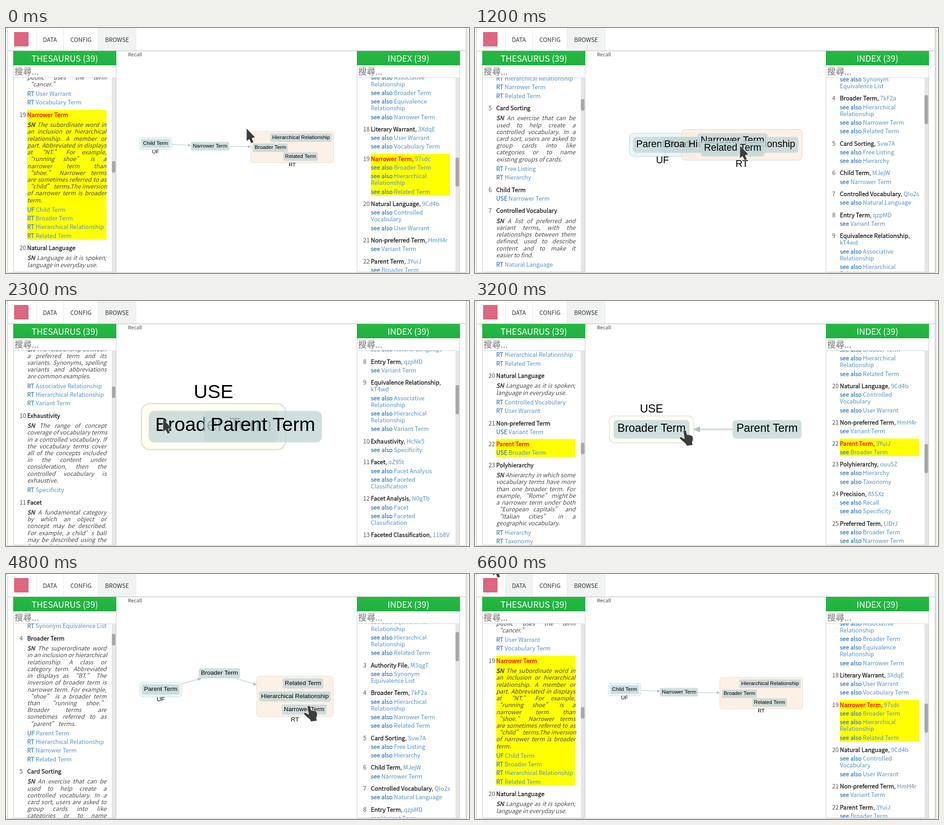
These frames come from a looping animation (1028 by 545 pixels, 6.7 s). An HTML page with a canvas:

```html
<!DOCTYPE html>
<html lang="zh-TW">
<head>
<meta charset="utf-8">
<title>Thesaurus browser</title>
<style>
html, body { margin: 0; width: 100%; height: 100%; overflow: hidden; background: #fff; }
body { position: relative; font: 300 13px/15.2px "Noto Sans CJK TC Light", "Noto Sans CJK TC", "Noto Sans CJK SC", "Noto Sans CJK JP", "Noto Sans CJK", "Noto Sans", sans-serif; color: #222; white-space: nowrap; }
div, canvas, svg { box-sizing: border-box; }
b { font-weight: inherit; -webkit-text-stroke: .35px currentColor; }
.abs, .nav div, .panel, .panel > div, .bar, .list { position: absolute; }
.frame { left: 3px; top: 0; width: 1019px; height: 545px; border: 1px solid #bbb; border-top: 0; box-shadow: 3px 0 4px #ddd; }
.nav { left: 4px; top: 0; width: 1017px; height: 51px; border-bottom: 1px solid #c8c8c8; box-shadow: 0 1px 2px #e4e4e4; }
.nav div { top: 0; height: 50px; line-height: 51px; text-align: center; border-right: 1px solid #e6e7e7; font-weight: 400; color: #333; }
.nav .on { background: #f1f2f2; }
.logo { left: 18px; top: 9px; width: 32px; height: 32px; background: #dd6680; }
.panel { top: 51px; width: 229px; height: 492px; border: 1px solid #ccc; }
.panel .head { left: -1px; top: -1px; width: 229px; height: 32px; background: linear-gradient(#25b942, #1fb141); color: #fff; font-weight: 400; font-size: 19px; line-height: 31px; text-align: center; }
.panel .find { left: 0; top: 31px; width: 227px; height: 28px; padding-left: 2px; border-bottom: 1px solid #d4d4d4; font-size: 19px; line-height: 25px; color: #757575; }
.panel .view { left: 0; top: 58px; width: 227px; height: 432px; overflow: hidden; }
.track { position: absolute; right: 0; top: 0; width: 9px; height: 432px; background: #e5e5e5; }
.bar { left: 0; width: 8px; border-radius: 4px; background: #a8a8a8; }
.list { left: 30px; top: 0; width: 176px; }
.entry { position: relative; padding: 3px 0 2.2px; margin-bottom: 7px; }
.entry i { position: absolute; left: -17px; font-style: normal; color: #555; }
.entry.hit { background: #ff0; }
.hit .name { color: #f00; }
.link { padding-top: 4px; }
.link, .code { color: #5591cd; }
.link b { color: #4183c4; }
.note { padding: 7.3px 0 2.2px; font-style: italic; color: #4c4c4c; }
.note b { color: #222; }
.note div { text-align: justify; text-align-last: justify; }
.note div:last-child { text-align-last: left; }
</style>
</head>
<body>
<div class="abs frame"></div>
<div class="abs nav">
  <div style="left:0;width:64px"></div>
  <div id="data" style="left:64px;width:60px">DATA</div>
  <div style="left:125px;width:76px">CONFIG</div>
  <div class="on" style="left:201px;width:84px">BROWSE</div>
</div>
<div class="abs logo"></div>
<div class="abs" style="left:271px;top:51px;font-size:11px;font-weight:400;color:#444">Recall</div>
<canvas class="abs" width="1028" height="545" style="left:0;top:0"></canvas>
<svg class="abs" width="1028" height="545" style="left:0;top:0;z-index:2">
  <g id="cursor" fill="#3c3c3c" stroke="#fff" stroke-width=".8">
    <path d="M0 0V29L6 24.500L10.500 33.500L16 31L12 22.500L19 20Z"/>
    <path transform="scale(.93)" d="M9 3Q9 0 12 0Q15 0 16 3L18 11Q25 11 30 14Q33 16 32 24L30 30L32 36L17 38L15 33L2 22Q-1 18 3 16L12 21Z"/>
  </g>
</svg>
<script>
// name; code; scope note lines; relations
const entries = `Associative Relationship;sd3JB;A relationship between|terms that are related.;RT Equivalence Relationship,RT Hierarchical Relationship,RT Related Term
Authority File;M3qgT;A list of terms includ-|ring with the preferred term|identified for each concept.;BT Controlled Vocabulary,RT Synonym Equivalence List
Broader Term;7kF2a;The superordinate word|in an inclusion or hierarchical|relationship. A class or|category term. Abbreviated|in displays as “BT.” The|inversion of broader term is|narrower term. For example,|“shoe” is a broader term|than “running shoe.”|Broader terms are|sometimes referred to as|“parent” terms.;UF Parent Term,RT Hierarchical Relationship,RT Narrower Term,RT Related Term
Card Sorting;Svw7A;An exercise that can be|used to help create a|controlled vocabulary. In a|card sort, users are asked to|group cards into like|categories or to name|existing groups of cards.;RT Free Listing,RT Hierarchy
Child Term;MJejW;;USE Narrower Term
Controlled Vocabulary;QIo2s;A list of preferred and|variant terms, with the|relationships between them|defined, used to describe|content and to make it|easier to find.;RT Natural Language
Entry Term;qzpMD;;USE Variant Term
Equivalence Relationship;kT4wd;The relationship between|a preferred term and its|variants. Synonyms, spelling|variants and abbreviations|are common examples.;RT Associative Relationship,RT Hierarchical Relationship,RT Variant Term
Exhaustivity;HcNe5;The range of concept|coverage of vocabulary terms|in a controlled vocabulary. If|the vocabulary terms cover|all of the concepts included|in the content under|consideration, then the|controlled vocabulary is|exhaustive.;RT Specificity
Facet;oZ95t;A fundamental category|by which an object or|concept may be described.|For example, a child’s ball|may be described using the|facets of size, weight, shape,|color, texture, material and|price.;RT Facet Analysis,RT Faceted Classification
Facet Analysis;N0gTb;The process of analyzing|content to determine|appropriate facets and;RT Facet,RT Faceted Classification
Faceted Classification;11b8V;A controlled vocabulary|that divides vocabulary|terms into facets.;BT Controlled Vocabulary
Free Listing;DfnKV;;RT Card Sorting,RT User Warrant
Granularity;Prll0;The level of specificity|with which content is|described. The more|granular, the more specific.;RT Specificity
Hierarchy;WOdFC;A collection of vocabulary|terms that show levels of|superordination and|subordination. Hierarchies|comprise broader terms and|narrower terms. Hierarchies|may be testing using card|sorting.;RT Card Sorting,RT Polyhierarchy,RT Taxonomy
Hierarchical Relationship;mVGXD;The relationship between|a broader term and its|narrower terms, as between|a class and its members or|a whole and its parts.;RT Associative Relationship,RT Broader Term,RT Equivalence Relationship,RT Narrower Term
Literary Warrant;3XdqE;Choosing a term because|it is found in the content|being described, even if the|public uses the term|“cancer.”;RT User Warrant,RT Vocabulary Term
Narrower Term;97sdc;The subordinate word in|an inclusion or hierarchical|relationship. A member or|part. Abbreviated in displays|at “NT.” For example,|“running shoe” is a|narrower term than|“shoe.” Narrower terms|are sometimes referred to as|“child” terms.The inversion|of narrower term is broader|term.;UF Child Term,RT Broader Term,RT Hierarchical Relationship,RT Related Term
Natural Language;9Cd4b;Language as it is spoken;|language in everyday use.;RT Controlled Vocabulary,RT User Warrant
Non-preferred Term;HmH4r;;USE Variant Term
Parent Term;3YuiJ;;USE Broader Term
Polyhierarchy;ouu5Z;Ahierarchy in which some|vocabulary terms have more|than one broader term. For|example, “Rome” might be|a narrower term under both|“European capitals” and|“Italian cities” in a|geographic vocabulary.;RT Hierarchy,RT Taxonomy
Precision;85SXz;The share of results that|are relevant to a search.;RT Recall,RT Specificity
Preferred Term;LIDrJ;The term chosen to stand|for a concept.;RT Broader Term,RT Narrower Term,RT Variant Term`
  .split('\n').map((line, i) => {
    const parts = line.split(';'), links = parts.pop();
    return { id: i + 2, name: parts[0], code: parts[1], note: parts.slice(2).join(';'),
      links: links.split(',').map(s => [s.slice(0, s.indexOf(' ')), s.slice(s.indexOf(' ') + 1)]) };
  });

const link = (kind, name) => `<div class="link"><b>${kind}</b> ${name}</div>`;
const noteHtml = note => note &&
  `<div class="note">${note.split('|').map((s, i) => `<div>${i ? '' : '<b>SN</b> '}${s}</div>`).join('')}</div>`;
const fold = name => name.length > 20 ? name.replace(' ', '<br>') : name;

const thesaurusBody = e => noteHtml(e.note) + e.links.map(l => link(...l)).join('');
const indexBody = e => e.links.filter(l => /RT|USE/.test(l[0]))
  .map(([kind, name]) => link(kind === 'RT' ? 'see also' : 'see', fold(name))).join('');
const codeHtml = e => `,${e.name.length > 22 ? '<br>' : ' '}<span class="code">${e.code}</span>`;

function makePanel(left, title, barHeight, head, body) {
  const el = document.createElement('div');
  el.className = 'panel';
  el.style.left = left + 'px';
  el.innerHTML = `<div class="head">${title} (39)</div><div class="find">搜尋...</div>
    <div class="view"><div class="list">${entries.map(e =>
      `<div class="entry"><i>${e.id}</i><b class="name">${e.name}</b>${head(e)}${body(e)}</div>`).join('')}</div>
    <div class="track"><div class="bar" style="height:${barHeight}px"></div></div></div>`;
  document.body.append(el);
  return { list: el.querySelector('.list'), bar: el.querySelector('.bar'), rows: [...el.querySelectorAll('.entry')] };
}
const panels = [
  makePanel(16, 'THESAURUS', 26, () => '', thesaurusBody),
  makePanel(779, 'INDEX', 65, codeHtml, indexBody)
];

const lerp = (a, b, p) => a + (b - a) * p;
const easeIn = p => p * p, easeOut = p => p * (2 - p), easeBoth = p => (1 - Math.cos(Math.PI * p)) / 2;

// Returns the keys around t and the progress between them.
function span(keys, t) {
  let i = keys.length - 1;
  while (keys[i][0] > t) i--;
  const a = keys[i], b = keys[i + 1] || a;
  return [a, b, a === b ? 0 : (t - a[0]) / (b[0] - a[0])];
}

// Scroll stops: entry, its y in both panels, both scrollbar positions
const atNarrower = [19, 193, 291, 296, 288], atBroader = [4, 193, 290, 131, 124], atParent = [22, 318, 317, 315, 318];
const scrolls = [
  [0, atNarrower], [550, atNarrower],
  [900, [16, 368, 426, 263, 243], easeIn], [1450, atBroader, easeOut], [2050, atBroader],
  [2700, atParent, easeBoth], [3560, atParent],
  [3900, [11, 285, 260, 223, 210], easeIn], [4160, atBroader, easeOut], [4730, atBroader],
  [4800, [4, 143, 264, 133, 129], easeIn], [5430, atNarrower, easeBoth]
];

function drawPanels(t) {
  const [a, b, raw] = span(scrolls, t), p = (b[2] || easeBoth)(raw);
  const still = a[1] === b[1];
  panels.forEach(({ list, bar, rows }, side) => {
    const offset = ([id, ...v]) => v[side] - 120.6 - rows[id - 2].offsetTop;
    list.style.transform = `translateY(${Math.round(lerp(offset(a[1]), offset(b[1]), p))}px)`;
    bar.style.top = lerp(a[1][3 + side], b[1][3 + side], p) - 110 + 'px';
    rows.forEach((row, i) => row.classList.toggle('hit', still && i + 2 === a[1][0]));
  });
}

// Graphs: groups hold a label, first and last node; edges join boxes by key
const around = (side, main, ...rest) => ({
  names: [side, main, ...rest],
  groups: [['UF', 0, 1], ['RT', 2, 5]],
  edges: [['UF', 1], [1, 'RT']]
});
const narrower = around('Child Term', 'Narrower Term', 'Hierarchical Relationship', 'Broader Term', 'Related Term');
const broader = around('Parent Term', 'Broader Term', 'Hierarchical Relationship', 'Narrower Term', 'Related Term');
const parent = { names: ['Broader Term', 'Parent Term'], groups: [['USE', 0, 1]], edges: [[1, 'USE']] };

// Layouts: font size, then node centres
const pile = [34.2, ...Array(5).fill([512, 253]).flat()];
const narrowerLayout = [11.6, 332, 257, 453, 263, 655, 244, 587, 266.5, 654, 286];
const views = [
  [0, narrower, narrowerLayout],
  [600, broader, pile], [900, broader, pile],
  [1800, broader, [10.1, 331.5, 266, 461, 266, 664, 266, 624.5, 250, 625.5, 282]],
  [2100, parent, [56, 512, 275, 512, 275]],
  [2700, parent, [25, 392, 285.5, 648.5, 285.5]],
  [3700, broader, pile],
  [3900, broader, [23.5, 368, 256, 482, 224.5, 627, 269.5, 646.5, 295, 644.5, 243.5]],
  [4300, broader, [13.6, 343.5, 257, 474, 221, 641.5, 272.5, 662, 301.5, 659.5, 243.5]],
  [5200, narrower, pile], [5500, narrower, narrowerLayout]
];
const tints = {
  UF: ['rgba(226,245,246,.75)', '#cfe0e2'],
  RT: ['rgba(253,236,222,.75)', '#e6dcd6'],
  USE: ['rgba(255,255,238,.75)', '#dfe4dd']
};
const ctx = document.querySelector('canvas').getContext('2d');

function roundBox([l, t, r, b], radius, pad = 0) {
  ctx.beginPath();
  ctx.roundRect(l - pad, t - pad, r - l + 2 * pad, b - t + 2 * pad, radius);
}

// Point where the line from the box centre towards (x, y) leaves the box
function exit([l, t, r, b], x, y) {
  const cx = (l + r) / 2, cy = (t + b) / 2, dx = x - cx, dy = y - cy;
  const k = Math.min(1, (r - l) / 2 / (Math.abs(dx) || 1e-6), (b - t) / 2 / (Math.abs(dy) || 1e-6));
  return [cx + dx * k, cy + dy * k];
}

function drawEdge(from, to, size) {
  const mid = ([l, t, r, b]) => [(l + r) / 2, (t + b) / 2];
  const [x1, y1] = exit(from, ...mid(to)), [x2, y2] = exit(to, ...mid(from));
  const overlap = from[0] < to[2] && to[0] < from[2] && from[1] < to[3] && to[1] < from[3];
  if (overlap) return;
  ctx.strokeStyle = '#cfdfde';
  ctx.lineWidth = Math.max(1, size * .16);
  ctx.beginPath();
  ctx.moveTo(x1, y1);
  ctx.lineTo(x2, y2);
  ctx.stroke();
  ctx.save();
  ctx.translate(x2, y2);
  ctx.rotate(Math.atan2(y2 - y1, x2 - x1));
  ctx.fillStyle = '#b5bcbb';
  ctx.beginPath();
  ctx.moveTo(0, 0);
  ctx.lineTo(-size * .55, -size * .27);
  ctx.lineTo(-size * .55, size * .27);
  ctx.fill();
  ctx.restore();
}

function drawGraph(t) {
  const [a, next, raw] = span(views, t), b = next[1] === a[1] ? next : a, p = easeBoth(raw);
  const { names, groups, edges } = a[1], A = a[2], B = b[2];
  const size = 1 / lerp(1 / A[0], 1 / B[0], p);
  const place = (i, origin) => origin + lerp((A[i] - origin) / A[0], (B[i] - origin) / B[0], p) * size;

  ctx.clearRect(0, 0, 1028, 545);
  ctx.save();
  ctx.beginPath();
  ctx.rect(271, 70, 482, 472);
  ctx.clip();
  ctx.font = `${size}px "Liberation Sans", Arial, sans-serif`;
  ctx.textAlign = 'center';
  ctx.textBaseline = 'middle';

  const boxes = {};
  names.forEach((name, i) => {
    const x = place(2 * i + 1, 512), y = place(2 * i + 2, 265);
    const w = ctx.measureText(name).width / 2 + size * .34, h = size * .82;
    boxes[i] = [x - w, y - h, x + w, y + h];
  });
  for (const [label, first, end] of groups) {
    const inner = names.map((_, i) => boxes[i]).slice(first, end), pad = size * .38;
    const edge = (k, pick, d) => pick(...inner.map(box => box[k])) + d;
    const box = boxes[label] = [edge(0, Math.min, -pad), edge(1, Math.min, -pad), edge(2, Math.max, pad), edge(3, Math.max, pad)];
    roundBox(box, size * .45);
    [ctx.fillStyle, ctx.strokeStyle] = tints[label];
    ctx.lineWidth = Math.max(1, size * .07);
    ctx.fill();
    ctx.stroke();
    ctx.fillStyle = '#000';
    ctx.fillText(label, (box[0] + box[2]) / 2, label === 'USE' ? box[1] - size * .56 : box[3] + size * .44);
  }
  edges.forEach(([from, to]) => drawEdge(boxes[from], boxes[to], size));
  names.forEach((name, i) => {
    const [l, top, r, bottom] = boxes[i];
    roundBox(boxes[i], size * .3);
    ctx.fillStyle = 'rgba(195,215,215,.8)';
    ctx.fill();
    ctx.fillStyle = '#000';
    ctx.fillText(name, (l + r) / 2, (top + bottom) / 2 - size * .05);
  });
  const pressed = t >= 1900 && t < 2100 ? 'UF' : t >= 3500 && t < 3700 ? 'USE' : '';
  if (pressed) {
    roundBox(boxes[pressed], size * .3, size * .25);
    ctx.fillStyle = 'rgba(0,0,0,.27)';
    ctx.fill();
  }
  ctx.restore();
}

// Pointer path: x, y, hand or arrow
const path = [
  [0, 534, 223, 0], [100, 565, 245, 0], [200, 588, 261, 1], [1200, 588, 261, 0], [1800, 322, 256, 1],
  [2200, 322, 256, 0], [2700, 454, 287, 1], [3700, 454, 287, 1], [3900, 441, 279, 1], [4300, 661, 338, 1],
  [4600, 661, 293, 1], [5500, 661, 293, 0], [6200, 100, -3, 0], [6400, 57, -14, 0], [6600, 40, -25, 0]
];
const cursor = document.getElementById('cursor');

function drawCursor(t) {
  const [a, b, p] = span(path, t);
  cursor.setAttribute('transform', `translate(${lerp(a[1], b[1], p)} ${lerp(a[2], b[2], p)})`);
  [...cursor.children].forEach((shape, i) => shape.style.display = i === a[3] ? '' : 'none');
}

// The screen refreshes only at these moments
const range = (from, to) => Array.from({ length: (to - from) / 100 + 1 }, (_, i) => from + i * 100);
const ticks = [0, 100, 200, ...range(600, 1900), ...range(2100, 2400), 3200, 3300, 3500, ...range(3700, 3900),
  4100, 4300, 4600, 4800, 5200, 5400, 5500, ...range(5700, 6200), 6400, 6600];
const data = document.getElementById('data'), start = performance.now();
let shown = -1;

function draw() {
  const now = Math.max(0, performance.now() - start) % 6700;
  const t = ticks.findLast(tick => tick <= now);
  if (t !== shown) {
    shown = t;
    drawPanels(t);
    drawGraph(t);
    drawCursor(t);
    data.classList.toggle('on', t >= 6200);
  }
  requestAnimationFrame(draw);
}
draw();
</script>
</body>
</html>
```
